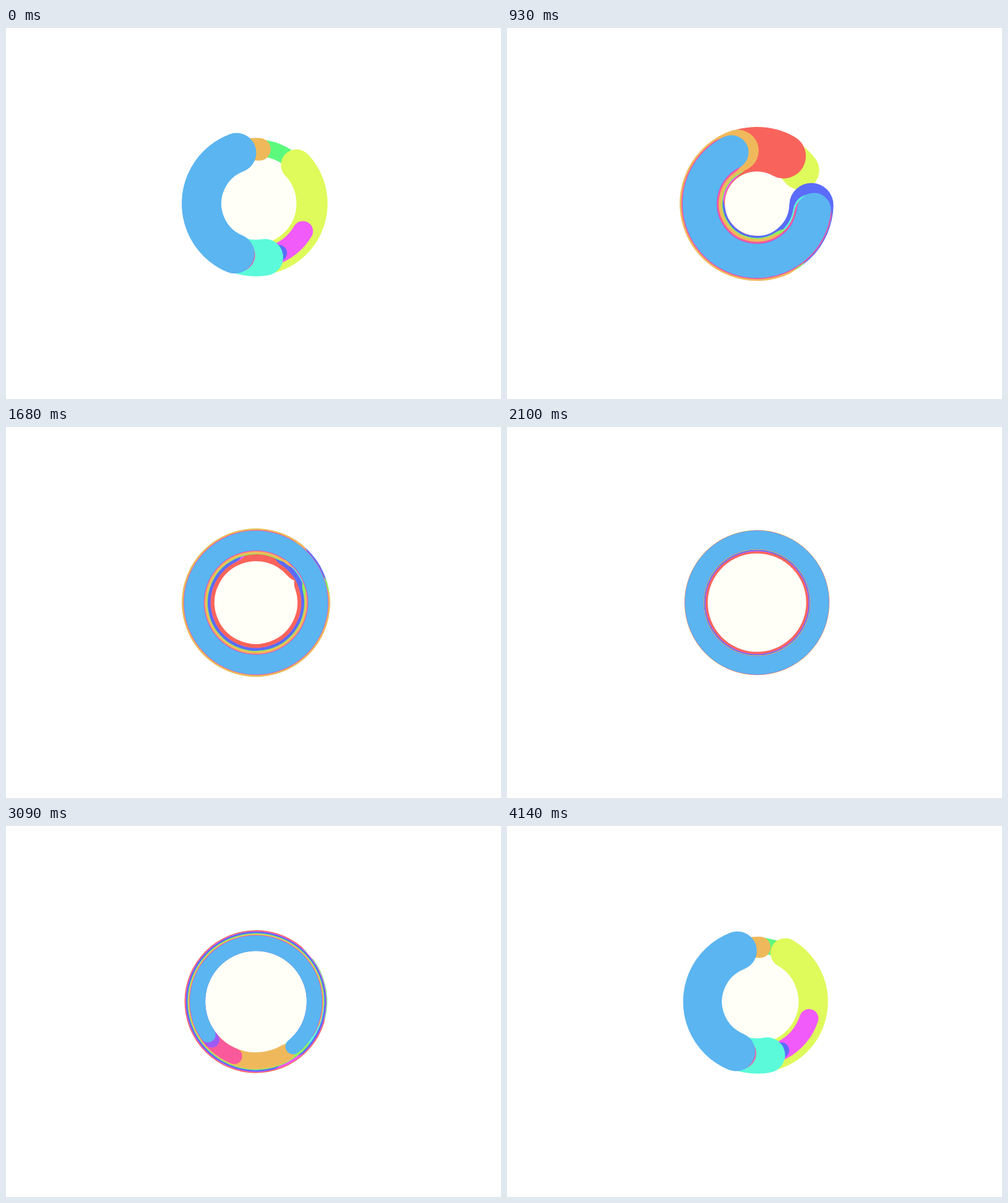
These frames come from a looping animation (800x600 px, 4170 ms). An HTML page with a canvas:

```html
<!DOCTYPE html>
<html lang="en">
<head>
<meta charset="utf-8">
<title>Ring loop</title>
<style>
html, body { margin: 0; width: 100%; height: 100%; overflow: hidden; background: #fff; }
canvas { display: block; width: 800px; height: 600px; }
</style>
</head>
<body>
<canvas id="stage" width="800" height="600"></canvas>
<script>
const LOOP = 4170, STEP = 30, CX = 404, CY = 284;
const ctx = document.getElementById('stage').getContext('2d');

// All arcs share one motion. Each has its own delays (ms) for turning, growing
// and thickening, and a constant angle. Listed from top to bottom.
const arc = (color, turn, angle, grow, thick) => ({ color, turn, angle, grow, thick });
const arcs = [
  arc('#5bb5f0', 0, 0, 0, 0),
  arc('#a05bf5', 15, 0, 15, 25),
  arc('#fa5a9b', 70, -3, 70, 150),
  arc('#efb95b', 230, 24, 314, 350),
  arc('#8cf55b', 250, 14, 320, 380),
  arc('#5bfada', 20, -25, 330, 90),
  arc('#5b6cfa', 0, -37, 400, 500),
  arc('#f05bfa', 600, -10, 600, 400),
  arc('#f8645b', 650, 25, 150, 600),
  arc('#dffa5b', 930, 64, 560, 200),
  arc('#5bfa7d', 930, 5, 530, 500)
];

// Key points as [ms, value]
const turnKeys = [[0, 271], [930, 215], [1680, 220], [2610, 232], [3090, 368], [3690, 607]];
const thickKeys = [[0, 64], [350, 72], [930, 55], [1680, 32], [2610, 28], [3090, 25], [3590, 25]];

const wrap = t => ((t % LOOP) + LOOP) % LOOP;

// Monotone cubic through periodic keys; each loop adds `gain`.
function curve(keys, time, gain = 0) {
  const n = keys.length, t = wrap(time);
  const key = i => {
    const lap = Math.floor(i / n), [ms, value] = keys[i - lap * n];
    return [ms + lap * LOOP, value + lap * gain];
  };
  const slope = i => (key(i + 1)[1] - key(i)[1]) / (key(i + 1)[0] - key(i)[0]);
  const tangent = i => {
    const a = slope(i - 1), b = slope(i);
    return a * b > 0 ? 2 * a * b / (a + b) : 0;
  };
  let i = n - 1;
  while (key(i)[0] > t) i--;
  const [t0, v0] = key(i), [t1, v1] = key(i + 1);
  const d = t1 - t0, u = (t - t0) / d, v = 1 - u;
  return v0 * v * v * (1 + 2 * u) + v1 * u * u * (3 - 2 * u)
    + d * u * v * (tangent(i) * v - tangent(i + 1) * u);
}

const span = t => Math.min(359.9, 258 - 122 * Math.cos(2 * Math.PI * t / LOOP));

function radius(t) {
  const p = (wrap(t) - 600) / 2950;
  return 88 + (p > 0 && p < 1 ? 13.5 * Math.sin(Math.PI * p) : 0);
}

function drawArc(a, depth, t) {
  const rad = deg => (deg - 90) * Math.PI / 180;
  const middle = curve(turnKeys, t - a.turn, 360) + a.angle;
  const half = span(t - a.grow) / 2;
  const lag = Math.min(12.5 * depth * depth, 800);
  ctx.beginPath();
  ctx.arc(CX, CY, radius(t - lag), rad(middle - half), rad(middle + half));
  ctx.lineWidth = curve(thickKeys, t - a.thick);
  ctx.strokeStyle = a.color;
  ctx.stroke();
}

function draw(t) {
  ctx.clearRect(0, 0, 800, 600);
  ctx.fillStyle = '#fffff7';
  ctx.beginPath();
  ctx.arc(CX, CY, 88, 0, 2 * Math.PI);
  ctx.fill();
  ctx.lineCap = 'round';
  for (let i = arcs.length - 1; i >= 0; i--) drawArc(arcs[i], i, t);
}

const start = performance.now();
function tick() {
  const t = wrap(performance.now() - start);
  draw(Math.floor(t / STEP) * STEP);
  requestAnimationFrame(tick);
}
tick();
</script>
</body>
</html>
```
